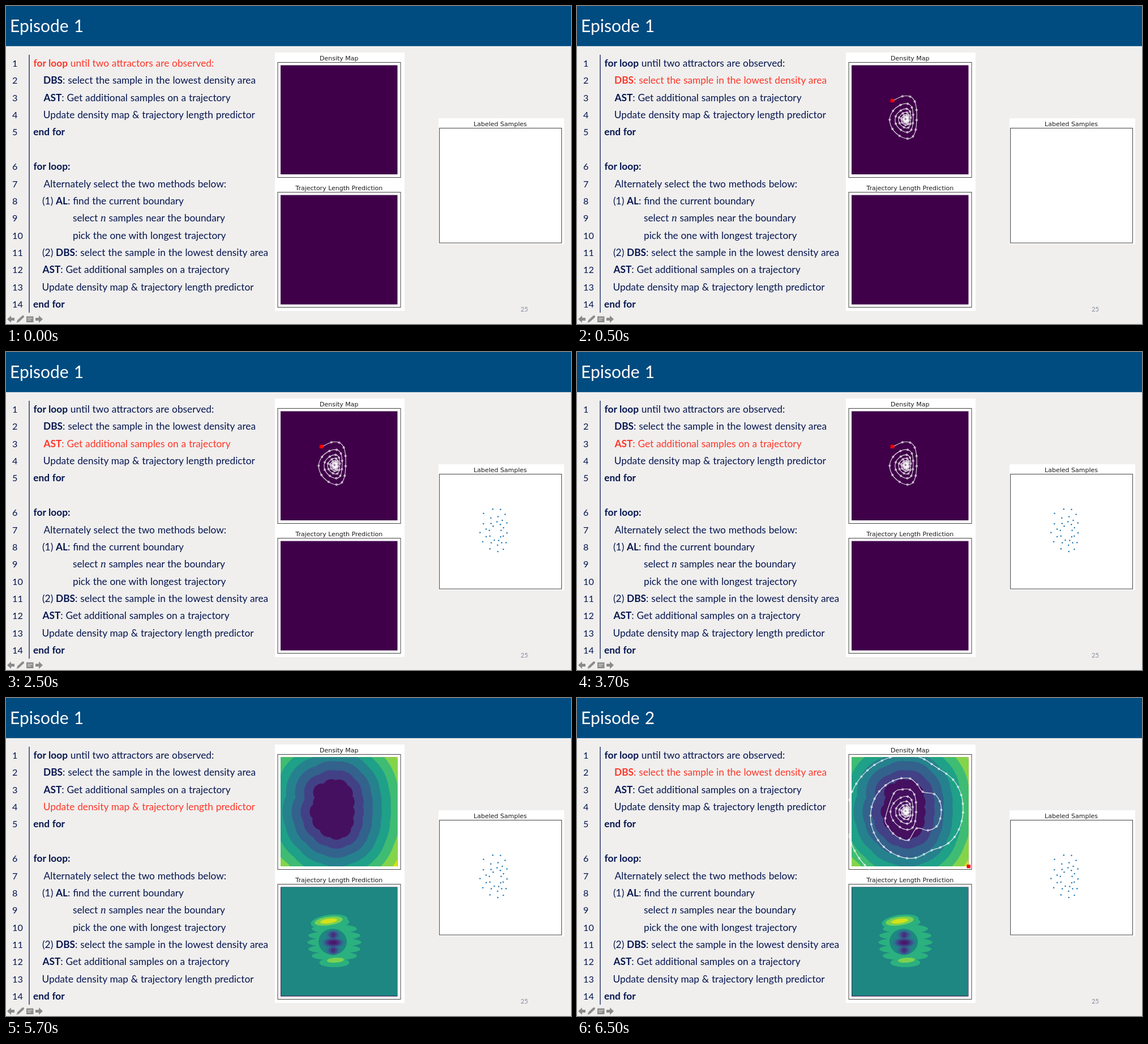
An HTML page that plays this animation: 998x561 px, repeating every 8000 ms.

```html
<!DOCTYPE html>
<html lang="en">
<head>
<meta charset="utf-8">
<title>Sampling episodes</title>
<style>
  html, body { margin: 0; width: 100%; height: 100%; overflow: hidden; background: #f0efee; }
  svg { display: block; width: 100%; height: 100%; }
  text { white-space: pre; }
  .title { font: 30px Lato, sans-serif; fill: #fff; word-spacing: 1.5px; }
  .code { font: 17.3px Lato, sans-serif; fill: #06164f; word-spacing: .4px; }
  .num { font: 16.2px Lato, sans-serif; fill: #06164f; }
  .code .b { font-weight: 700; }
  .code .var { font: italic 19px "Liberation Serif", serif; }
  .plot { font: 11px "DejaVu Sans", sans-serif; fill: #1c1c1c; text-anchor: middle; }
  .page { font: 11.3px Lato, sans-serif; fill: #878c9b; }
  .axes { fill: none; stroke: #444; stroke-width: 1; }
  .trail { fill: none; stroke: #fff; stroke-width: 1.15; stroke-opacity: .85; }
  .mark { fill: #fff; fill-opacity: .35; stroke: #fff; stroke-width: .8; stroke-opacity: .75; }
  .anim { animation: 8s step-end infinite; }

  .red1 { animation-name: red1; }
  .red2 { animation-name: red2; }
  .red3 { animation-name: red3; }
  .red4 { animation-name: red4; }
  .ep1 { animation-name: ep1; }
  .ep2 { animation-name: ep2; }
  .first { animation-name: first; }
  .labels { animation-name: labels; }
  .maps { animation-name: maps; }
  @keyframes red1 { 0% { fill: #ff3527 } 6.25%, 100% { fill: #06164f } }
  @keyframes red2 { 0% { fill: #06164f } 6.25% { fill: #ff3527 } 31.25% { fill: #06164f } 81.25%, 100% { fill: #ff3527 } }
  @keyframes red3 { 0% { fill: #06164f } 31.25% { fill: #ff3527 } 56.25%, 100% { fill: #06164f } }
  @keyframes red4 { 0% { fill: #06164f } 56.25% { fill: #ff3527 } 81.25%, 100% { fill: #06164f } }
  @keyframes ep1 { 0% { visibility: visible } 81.25%, 100% { visibility: hidden } }
  @keyframes ep2 { 0% { visibility: hidden } 81.25%, 100% { visibility: visible } }
  @keyframes first { 0% { visibility: hidden } 6.25% { visibility: visible } 56.25%, 100% { visibility: hidden } }
  @keyframes labels { 0% { visibility: hidden } 31.25%, 100% { visibility: visible } }
  @keyframes maps { 0% { visibility: hidden } 56.25%, 100% { visibility: visible } }
</style>
</head>
<body>
<svg viewBox="0 0 998 561" preserveAspectRatio="none">
  <defs>
    <clipPath id="fillBox"><rect x="485" y="104.5" width="206.5" height="192.5"/></clipPath>
    <clipPath id="axesBox"><rect x="480" y="100" width="217" height="202.5"/></clipPath>
  </defs>
  <rect width="998" height="561" fill="#f0efee"/>
  <rect width="998" height="70.8" fill="#004b80"/>
  <text class="title anim ep1" x="7" y="46">Episode 1</text>
  <text class="title anim ep2" x="7" y="46">Episode 2</text>

  <path d="M41 86V541" stroke="#1b2c63" stroke-width="1.4"/>
  <g id="code"></g>

  <rect x="475" y="82" width="229" height="456" fill="#fff"/>
  <rect x="764" y="198" width="222" height="222" fill="#fff"/>
  <text class="plot" x="588.3" y="95.7">Density Map</text>
  <text class="plot" x="588.3" y="324.8">Trajectory Length Prediction</text>
  <text class="plot" x="873" y="212">Labeled Samples</text>

  <rect x="485" y="104.5" width="206.5" height="192.5" fill="#3f0049"/>
  <rect x="485" y="333.5" width="206.5" height="193" fill="#3f0049"/>
  <g id="density" class="anim maps" clip-path="url(#fillBox)"></g>
  <g id="lengths" class="anim maps"></g>
  <rect class="axes" x="480" y="99.5" width="217" height="203"/>
  <rect class="axes" x="480" y="328.5" width="217" height="203"/>
  <rect class="axes" x="765.5" y="215.5" width="216" height="202.5"/>

  <g id="trail1" class="anim first" clip-path="url(#axesBox)"></g>
  <rect class="anim first" x="553.8" y="163.8" width="6.6" height="6.2" fill="#f00"/>
  <g id="trail2" class="anim ep2" clip-path="url(#axesBox)"></g>
  <rect class="anim ep2" x="688.5" y="294" width="6.5" height="6.2" fill="#f00"/>
  <g id="samples" class="anim labels" fill="#1f77b4"></g>

  <text class="page" x="909" y="538.8">25</text>
  <g fill="#8b8b8b">
    <path d="M2 552.5l7-6.5v4h6v5h-6v4z"/>
    <path d="M18.5 559l1.8-5 8.4-7.7q1.5-1 2.7.2 1.2 1.3.1 2.7l-8.3 7.8z"/>
    <path d="M36 547.5h12.5v10.500H36z"/>
    <path d="M65 552.5l-7-6.5v4h-6v5h6v4z"/>
    <path d="M38 551h8.5M38 554h6" stroke="#efeeed"/>
  </g>
</svg>
<script>
  const $ = id => document.getElementById(id);
  const { PI, cos, sin, exp, sqrt, abs, max } = Math;
  const rad = deg => deg * PI / 180;
  const range = (n, f) => Array.from({ length: n }, (_, i) => f(i));
  const dot = ([x, y], r, cls = '') => `<circle class="${cls}" cx="${x}" cy="${y}" r="${r}"/>`;
  const oval = (x, y, rx, ry, fill, tilt = 0) =>
    `<ellipse cx="${x}" cy="${y}" rx="${rx}" ry="${ry}" fill="${fill}" transform="rotate(${tilt} ${x} ${y})"/>`;

  // Listing: [row, x, markup]
  const bold = s => `<tspan class="b">${s}</tspan>`;
  const dbs = bold('DBS') + ': select the sample in the lowest density area';
  const ast = bold('AST') + ': Get additional samples on a trajectory';
  const update = 'Update density map &amp; trajectory length predictor';
  const lines = [
    [0, 48.5, bold('for loop') + ' until two attractors are observed:'],
    [1, 66, dbs],
    [2, 66.5, ast],
    [3, 65.8, update],
    [4, 48.3, bold('end for')],
    [6, 48.5, bold('for loop:')],
    [7, 66.5, 'Alternately select the two methods below:'],
    [8, 64, '(1) ' + bold('AL') + ': find the current boundary'],
    [9, 118, 'select <tspan class="var">n</tspan> samples near the boundary'],
    [10, 118, 'pick the one with longest trajectory'],
    [11, 64, '(2) ' + dbs],
    [12, 64.5, ast],
    [13, 63.5, update],
    [14, 48, bold('end for')]
  ];
  $('code').innerHTML = lines.map(([row, x, s], i) => {
    const y = 107 + row * 30.36;
    const cls = i < 4 ? `code anim red${i + 1}` : 'code';
    return `<text class="num" x="11" y="${y}">${i + 1}</text><text class="${cls}" x="${x}" y="${y}">${s}</text>`;
  }).join('');

  // Clockwise spiral into the attractor, flattened on its right side
  const spiral = size => range(60, k => {
    const deg = -130 + 25 * k + .28 * k * k;
    const c = cos(rad(deg)), s = size * exp(-.4 * deg / 360);
    return [581 + s * (27 * c - 10 * c * c + 2), 200 + s * 37.5 * sin(rad(deg))];
  });

  // Wide orbit around both wells; its dents deepen as it shrinks
  function orbit() {
    const pts = [];
    for (let turn = -1.2, r; turn < .98; turn += 15.5 / (2 * PI * r)) {
      const a = PI + turn * 2 * PI;
      const off = Math.acos(cos(a)) - rad(58);
      const dent = .25 * exp(1.35 * (turn - .3)) * exp(-((off / rad(18)) ** 2));
      r = 68 * exp(-.5 * turn) * (1.04 + .08 * cos(a)) * (1 - dent);
      pts.push([584 + r * cos(a), 203 + r * sin(a)]);
    }
    return pts;
  }

  // Catmull-Rom curve through the points
  function smooth(p) {
    const ctrl = (q, a, b) => [q[0] + (b[0] - a[0]) / 6, q[1] + (b[1] - a[1]) / 6];
    return 'M' + p[0] + p.slice(1).map((c, i) => {
      const b = p[i], a = p[i - 1] || b, d = p[i + 2] || c;
      return `C${ctrl(b, a, c)} ${ctrl(c, d, b)} ${c}`;
    }).join('');
  }
  const trail = p => `<path class="trail" d="${smooth(p)}"/>` + p.map(q => dot(q, 1.7, 'mark')).join('');
  const path = spiral(1), labeled = path.slice(0, 33);
  $('trail1').innerHTML = trail(path);
  $('trail2').innerHTML = trail([...orbit(), ...spiral(.95)]);
  $('samples').innerHTML = labeled.map(([x, y]) => dot([x + 285, y + 118], 1.25)).join('');

  // Density bands: equal steps of distance to the nearest sample
  const bands = ['#45105f', '#424186', '#33628d', '#26818e', '#1fa088', '#3fbc73', '#84d44b', '#d8e219'];
  const spots = labeled.map(p => `M${p}h.01`).join('');
  $('density').innerHTML = bands.map((c, i) =>
    `<path d="${spots}" fill="none" stroke="${c}" stroke-width="${32 * (i + 1)}" stroke-linecap="round"/>`
  ).reverse().join('');

  // Length map: a lobed ring, bright caps and a dark three-lobed core
  const base = '#1e8781', green = '#2bb07f', lime = '#7ad151', yellow = '#d5e21a';
  const ring = range(7, i => {
    const u = (i - 3) / 3.6;
    return oval(580, 431 + u * 43, 48 * sqrt(1 - u * u), 8, green);
  });
  const core = ['#2b748e', '#3c508b', '#462f7c', '#481a6c'].flatMap((c, j) => [-1, 0, 1].map(d =>
    oval(578, 431.5 + 13.5 * d, max(0, 20 - 7 * abs(d) - 4.5 * j), max(0, 9.5 - abs(d) - 2.1 * j), c)));
  $('lengths').innerHTML = [
    `<rect x="485.7" y="333.5" width="205.3" height="192" fill="${base}"/>`,
    ...ring,
    oval(571, 394, 33, 11.5, green, -8),
    oval(577, 430, 25, 23, base),
    ...core,
    oval(570, 393.5, 25, 7.5, lime, -8),
    oval(570, 393.5, 15, 4, yellow, -8),
    oval(582, 462.5, 15, 4.5, lime, -4)
  ].join('');
</script>
</body>
</html>
```
